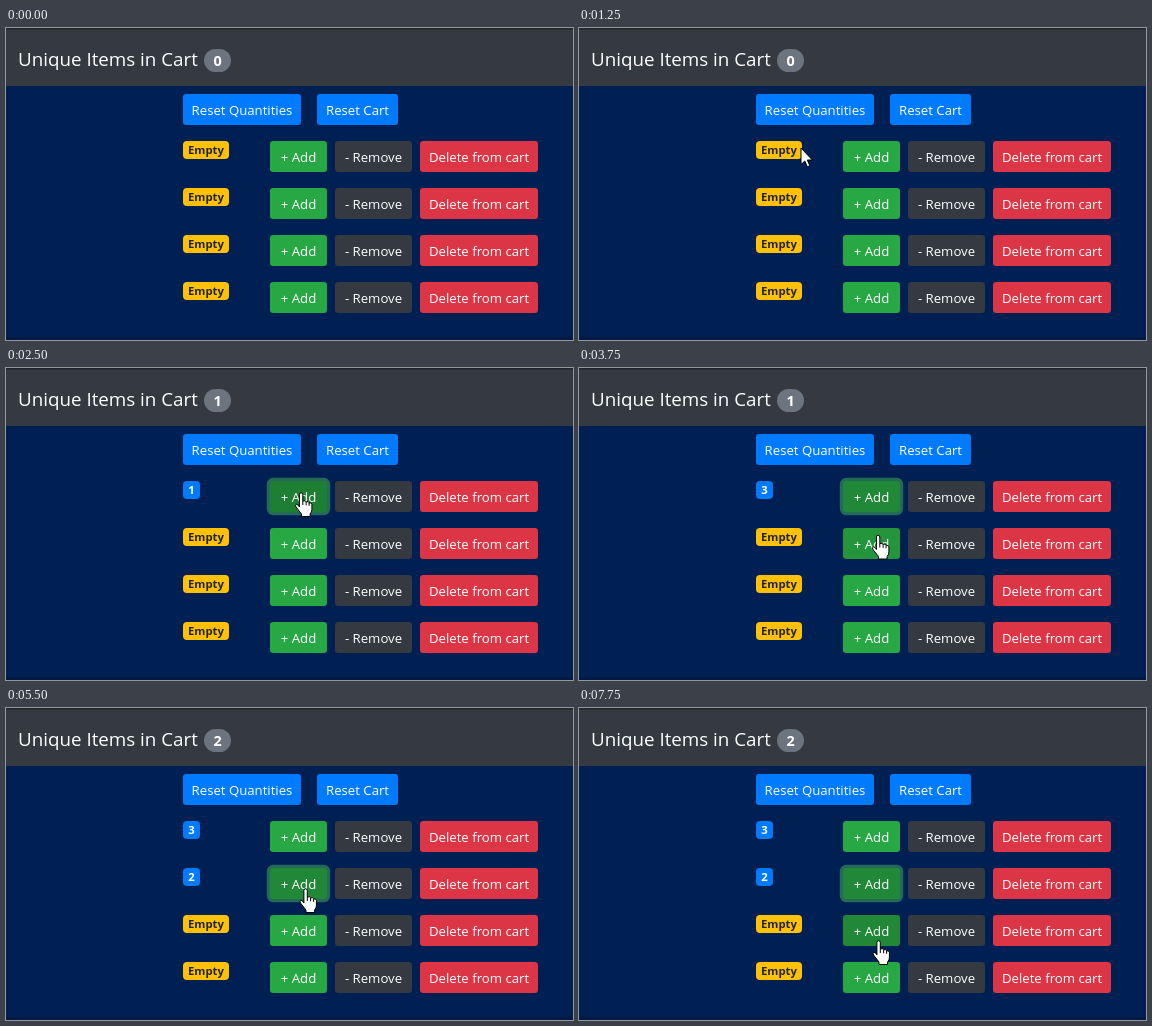
An HTML page that plays this animation: 567 by 312 pixels, repeating every 8000 ms.

```html
<!DOCTYPE html>
<html lang="en">
<head>
<meta charset="utf-8">
<title>Cart counter</title>
<style>
  html, body { margin: 0; width: 100%; height: 100%; overflow: hidden; background: #002053; }
  svg { display: block; width: 567px; height: 312px; }
  text { font-family: "Open Sans", "Noto Sans", sans-serif; fill: #fff; }
  .label { font-size: 13.2px; text-anchor: middle; }
  .badge { font-size: 11.3px; font-weight: 700; text-anchor: middle; }
</style>
</head>
<body>
<svg id="stage" viewBox="0 0 567 312">
  <rect width="567" height="312" fill="#002053"/>
  <rect y="309" width="567" height="3" fill="#001a43"/>
  <rect width="567" height="58" fill="#343a40"/>
  <rect width="567" height="1.5" fill="#212529"/>
  <text x="12" y="38" font-size="18.8">Unique Items in Cart</text>
  <rect x="198" y="21" width="27" height="23" rx="11.5" fill="#6c757d"/>
  <text id="count" x="211.5" y="38" font-size="14.4" font-weight="700" text-anchor="middle">0</text>
</svg>
<script>
const LOOP = 8000;
const BLUE = [0, 123, 255], BLUE_HOVER = [0, 105, 217];
const GREEN = [40, 167, 69], GREEN_HOVER = [33, 136, 56], GREEN_ACTIVE = [30, 126, 52];
const stage = document.getElementById("stage");
const count = document.getElementById("count");

function add(parent, tag, attrs, text) {
  const el = document.createElementNS("http://www.w3.org/2000/svg", tag);
  set(el, attrs);
  if (text) el.textContent = text;
  parent.appendChild(el);
  return el;
}

function set(el, attrs) {
  for (const k in attrs) el.setAttribute(k, attrs[k]);
}

const mix = (a, b, k) => `rgb(${a.map((v, i) => Math.round(v + (b[i] - v) * k))})`;

function button(x, y, width, label, fill) {
  const box = add(stage, "rect", { x, y, width, height: 31, rx: 3.2, fill });
  add(stage, "text", { x: x + width / 2, y: y + 20.8, class: "label" }, label);
  return box;
}

function makeRow(y) {
  const badge = add(stage, "rect", { x: 177, y, height: 18, rx: 4 });
  const value = add(stage, "text", { y: y + 13.4, class: "badge" });
  const ring = add(stage, "rect", {
    x: 260.8, y: y - 3.2, width: 63.4, height: 37.4, rx: 6.4, fill: "rgb(72,180,97)"
  });
  const plus = button(264, y, 57, "+ Add", "#28a745");
  button(329, y, 77, "- Remove", "#343a40");
  button(414, y, 118, "Delete from cart", "#dc3545");
  return { badge, value, ring, plus };
}

const reset = button(177, 66, 118, "Reset Quantities", "#007bff");
button(311, 66, 81, "Reset Cart", "#007bff");
const rows = [113, 160, 207, 254].map(makeRow);

const ink = { fill: "#fff", stroke: "#000", "stroke-width": 1, "stroke-linejoin": "round" };
const arrow = add(stage, "path", { ...ink, d: "M0 0V16.5L3.8 13L6.3 18.8L8.8 17.7L6.4 12H11.4Z" });
const hand = add(stage, "g", ink);
add(hand, "path", {
  d: "M-1.6 14.5V2a1.7 1.7 0 0 1 3.4 0V8.5q2.8-.8 3.3.8q2.6-.7 3 1q2.6-.4 2.8 1.6V17" +
     "q0 2.5-1.8 4.5V24H.5v-2.5L-5 14.5q-1.3-2 .5-2.6q1.6-.2 2.9 2.6Z"
});
add(hand, "path", { d: "M1.8 8.5v4M5.1 9.3v3.5M8.1 10.3v3", fill: "none" });

// Latest entry at or before t; each entry starts with its time.
const latest = (list, t) => list.filter(e => e[0] <= t).pop();

const pointer = [
  [0, null, 0, 0],
  [250, arrow, 211, 140],
  [500, arrow, 229, 100],
  [750, hand, 236, 85],
  [1000, hand, 232, 84],
  [1250, arrow, 222, 120],
  [1500, hand, 295, 124.5],
  [3750, hand, 299, 167],
  [4000, hand, 299.5, 180.5],
  [6500, hand, 299, 216],
  [6750, hand, 299.5, 232.5]
];
const resetHover = [[0, 0], [750, .6], [1000, 1], [1250, 0]];

// Per row: time, hover amount, focus ring amount
const looks = [
  [[0, 0, 0], [1500, .6, 0], [1750, 1, 0], [2000, 1, .7], [2250, 1, 1], [4500, .7, .5], [4750, 0, 0]],
  [[0, 0, 0], [3750, .6, 0], [4000, 1, 0], [4750, 1, .7], [5250, 1, 1]],
  [[0, 0, 0], [6750, 1, 0]],
  [[0, 0, 0]]
];
const clicks = [[2000, 2750, 3250], [4750, 5250], [], []];
const presses = [[2500, 3000], [], [], []];

function draw(ms) {
  const t = Math.floor(ms / 250) * 250;
  const quantities = clicks.map(list => list.filter(c => c <= t).length);
  count.textContent = quantities.filter(Boolean).length;
  reset.setAttribute("fill", mix(BLUE, BLUE_HOVER, latest(resetHover, t)[1]));

  rows.forEach((row, i) => {
    const [, hover, focus] = latest(looks[i], t);
    const n = quantities[i], width = n ? 17 : 46;
    set(row.badge, { width, fill: n ? "#007bff" : "#ffc107" });
    set(row.value, { x: 177 + width / 2, style: `fill:${n ? "#fff" : "#212529"}` });
    row.value.textContent = n || "Empty";
    row.ring.setAttribute("opacity", focus / 2);
    const pressed = presses[i].includes(t);
    row.plus.setAttribute("fill", mix(GREEN, pressed ? GREEN_ACTIVE : GREEN_HOVER, hover));
  });

  const [, shape, x, y] = latest(pointer, t);
  for (const el of [arrow, hand]) {
    set(el, { visibility: el === shape ? "visible" : "hidden", transform: `translate(${x} ${y})` });
  }
}

function frame() {
  draw(performance.now() % LOOP);
  requestAnimationFrame(frame);
}
frame();
</script>
</body>
</html>
```
